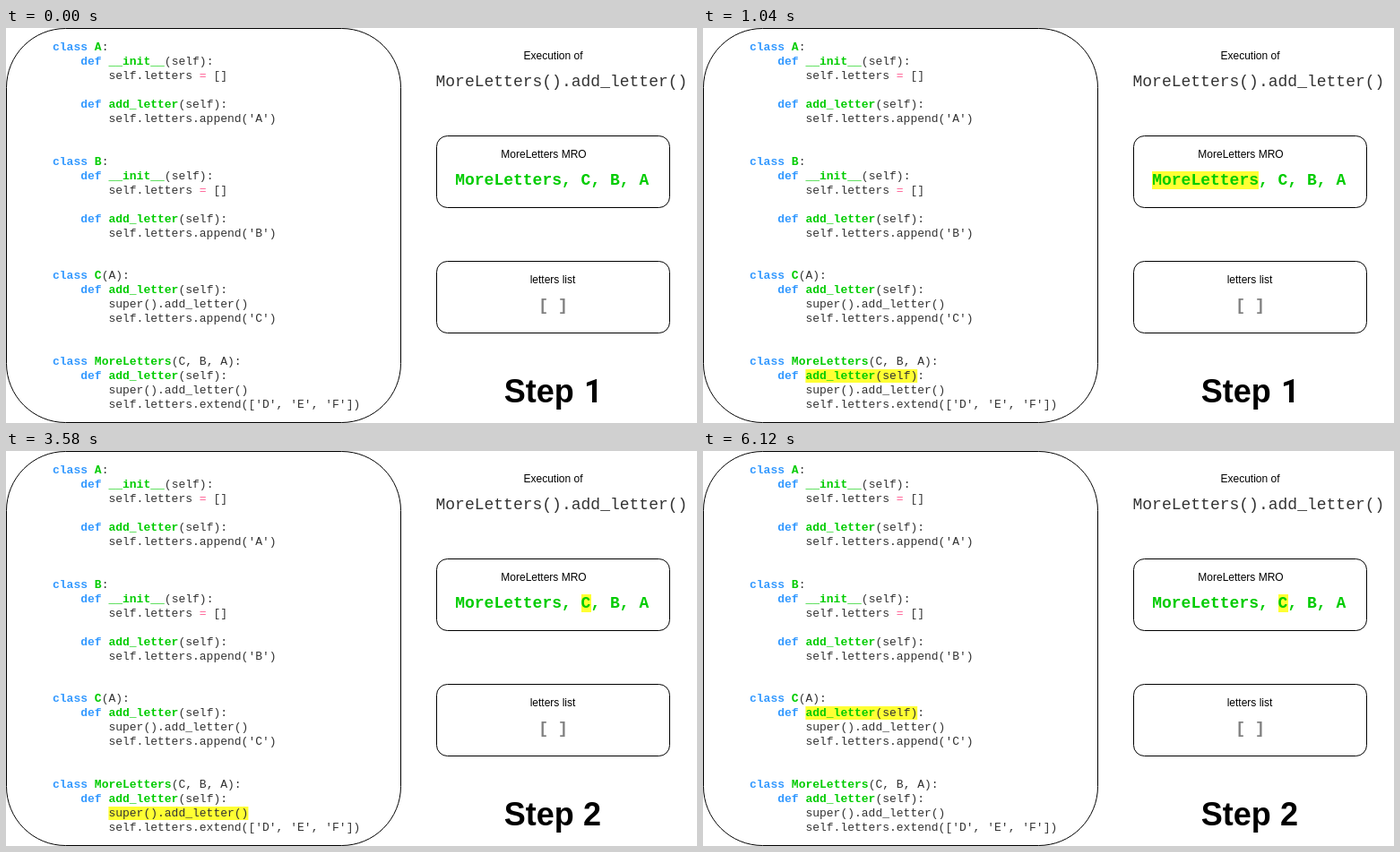
Write an HTML page that moves like this. It is 771x441 px and loops after 8000 ms.

```html
<!DOCTYPE html>
<html lang="en">
<head>
<meta charset="utf-8">
<style>
  html, body { margin: 0; width: 100%; height: 100%; overflow: hidden; background: #fff; }
  svg { display: block; }
  text { white-space: pre; font: 12px Helvetica, Arial, "Liberation Sans", sans-serif; }
  .code text, text.mono { font: 13px "Courier New", "Liberation Mono", monospace; fill: #333; }
  text.mono { font-size: 18px; }
  .kw, .name, text.bold { font-weight: bold; }
  .kw { fill: #3399ff; }
  .name, text.name { fill: #00cc00; }
  .op { fill: #ff6699; }
  text.list { fill: #808080; }
  .frame { fill: none; stroke: #000; }
  .mark { fill: #ffff33; }
  .mid { text-anchor: middle; }
  text.step { font-size: 36px; font-weight: bold; }
  #one { font-family: Roboto, Helvetica, sans-serif; } /* a "1" without a foot */
  .digits { isolation: isolate; }
  .digits text { mix-blend-mode: plus-lighter; }
</style>
</head>
<body>
<svg width="771" height="441" viewBox="0 0 771 441">
  <rect class="frame" x=".5" y=".5" width="440" height="440" rx="66"/>
  <rect class="frame" x="480.5" y="120.5" width="260" height="80" rx="12"/>
  <rect class="frame" x="480.5" y="260.5" width="260" height="80" rx="12"/>

  <rect class="mark" id="mroFirst" x="501" y="160" width="119" height="20"/>
  <rect class="mark" id="mroSecond" x="642" y="160" width="11" height="20"/>
  <rect class="mark" id="outerDef" x="114.4" y="381" width="124.8" height="15"/>
  <rect class="mark" id="outerSuper" x="114.4" y="397" width="156" height="15"/>
  <rect class="mark" id="innerDef" x="114.4" y="285" width="124.8" height="15"/>

  <g class="code" id="code"></g>

  <text class="mid" x="610.5" y="35">Execution of</text>
  <text class="mono" x="479.5" y="65">MoreLetters().add_letter()</text>
  <text class="mid" x="600" y="145">MoreLetters MRO</text>
  <text class="mono bold name" x="501.2" y="175">MoreLetters, C, B, A</text>
  <text class="mid" x="610" y="285">letters list</text>
  <text class="mono bold list" x="594.3" y="315">[ ]</text>

  <text class="step" x="555.8" y="418">Step</text>
  <g class="digits">
    <text class="step" id="one" x="645" y="418">1</text>
    <text class="step" id="two" x="644" y="418">2</text>
  </g>
</svg>
<script>
const source = `class A:
    def __init__(self):
        self.letters = []

    def add_letter(self):
        self.letters.append('A')


class B:
    def __init__(self):
        self.letters = []

    def add_letter(self):
        self.letters.append('B')


class C(A):
    def add_letter(self):
        super().add_letter()
        self.letters.append('C')


class MoreLetters(C, B, A):
    def add_letter(self):
        super().add_letter()
        self.letters.extend(['D', 'E', 'F'])`;

const byId = id => document.getElementById(id);
const span = (type, text) => `<tspan class="${type}">${text}</tspan>`;
const paint = line => line.replace(/(class|def) (\w+)|=/g, (all, word, name) =>
  word ? span('kw', word) + ' ' + span('name', name) : span('op', all));

byId('code').innerHTML = source.split('\n').map((line, row) => {
  const body = line.trimStart();
  const x = 52 + 7.8 * (line.length - body.length);
  return `<text x="${x}" y="${Math.round(25 + 15.965 * row)}">${paint(body)}</text>`;
}).join('');

// Each fade runs in ten 60 ms steps, the first one already at a tenth.
const fade = (time, start) =>
  Math.min(10, Math.max(0, Math.floor((time - start) / 60) + 1)) / 10;

function draw(now) {
  const time = now % 8000;
  const [a, b, c] = [500, 3040, 5580].map(start => fade(time, start));
  const levels = {
    mroFirst: a - b, mroSecond: b,
    outerDef: a - b, outerSuper: b - c, innerDef: c,
    one: 1 - b, two: b
  };
  for (const id in levels) byId(id).style.opacity = levels[id];
}

const begin = performance.now();
function tick() {
  draw(performance.now() - begin);
  requestAnimationFrame(tick);
}
tick();
</script>
</body>
</html>
```
